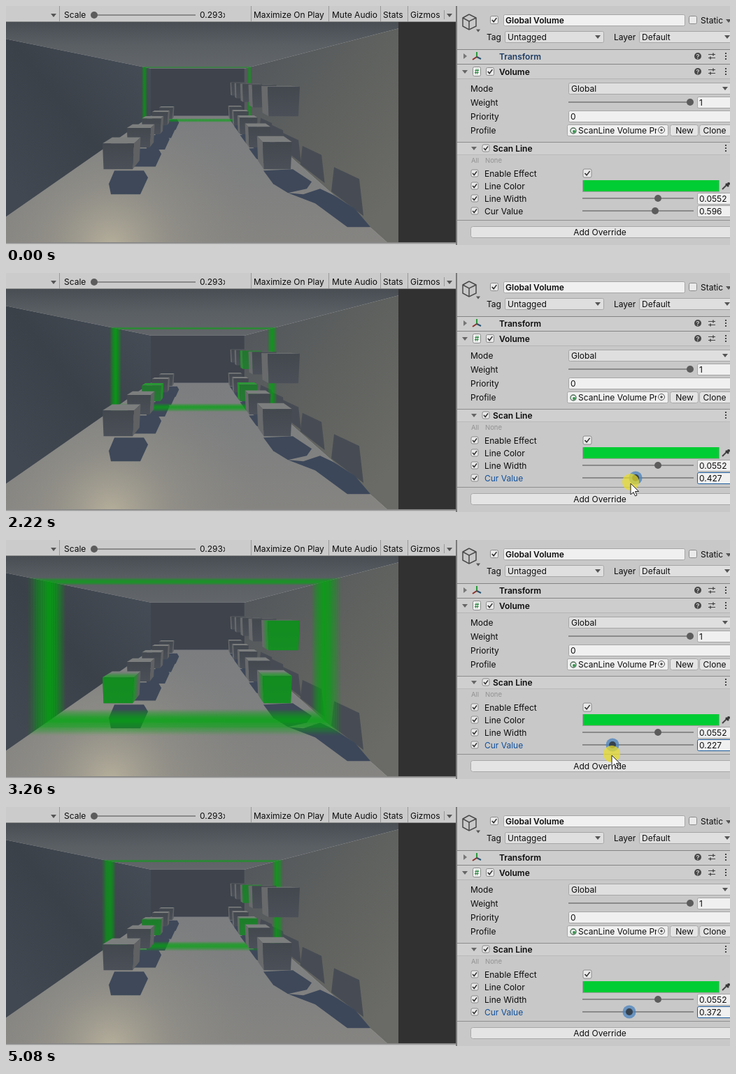
Recreate the animation shown at these times as an HTML page with a canvas. Size 1035 by 343 pixels, loop 6010 ms.

```html
<!DOCTYPE html>
<html lang="en">
<head>
<meta charset="utf-8">
<title>Scan line</title>
<style>
html, body { margin: 0; width: 100%; height: 100%; overflow: hidden; background: #c8c8c8; }
canvas { display: block; }
</style>
</head>
<body>
<canvas id="stage" width="1035" height="343"></canvas>
<script>
const ctx = document.getElementById('stage').getContext('2d');
const LOOP = 6010;
const VX = 282, VY = 105.3;          // vanishing point
const NEAR = 4.7, GAP = 1.5, DEEP = 0.5; // first cube, spacing, cube depth
const BAND = 0.55, GREEN = '#00a60e';

const BURSTS = [[370, 920, 8], [1230, 1790, 8], [1870, 2460, 8], [2550, 3100, 8],
  [3180, 3260, 2], [3960, 4370, 6], [4760, 5080, 5]];
const SCAN = [[1230, .596], [1400, .585], [1790, .53], [2207, .4], [2460, .34],
  [2943, .2525], [3100, .238], [3260, .227], [3959, .227], [3960, .221], [4206, .348], [4370, .372]];
const VALUE = [[1230, .596], [1400, .592], [1790, .552], [2207, .427], [2460, .366],
  [2943, .264], [3100, .246], [3260, .227], [3959, .227], [3960, .222], [4206, .348], [4370, .372]];
const MOUSE = [[370, 826, 338], [600, 900, 322], [760, 946, 308], [920, 927, 296], [1310, 927, 296],
  [1790, 913, 298], [2207, 893, 302], [2460, 883, 304], [2943, 870, 306], [3260, 866, 309],
  [3959, 866, 309], [4206, 889, 310], [4370, 893, 309], [4680, 893, 309], [5000, 946, 336], [5080, 950, 370]];

function stepTime(t) {
  let held = 0;
  for (const [start, end, steps] of BURSTS) {
    if (t < start) break;
    const step = (end - start) / (steps - 1);
    held = Math.min(end, start + Math.floor((t - start) / step + 1e-6) * step);
  }
  return held;
}

function sample(keys, t) {
  if (t <= keys[0][0]) return keys[0].slice(1);
  for (let i = 1; i < keys.length; i++) {
    const [a, b] = [keys[i - 1], keys[i]];
    if (t <= b[0]) {
      const u = (t - a[0]) / (b[0] - a[0]);
      return a.slice(1).map((v, j) => v + (b[j + 1] - v) * u);
    }
  }
  return keys[keys.length - 1].slice(1);
}

// --- drawing helpers ---
function rect(x, y, w, h, fill) {
  ctx.fillStyle = fill;
  ctx.fillRect(x, y, w, h);
}
function poly(points, fill) {
  ctx.beginPath();
  points.forEach(([x, y]) => ctx.lineTo(x, y));
  ctx.closePath();
  ctx.fillStyle = fill;
  ctx.fill();
}
function line(points, color, width = 1) {
  ctx.beginPath();
  points.forEach(([x, y]) => ctx.lineTo(x, y));
  ctx.strokeStyle = color;
  ctx.lineWidth = width;
  ctx.stroke();
}
function disc(x, y, r, fill) {
  ctx.beginPath();
  ctx.arc(x, y, r, 0, 7);
  ctx.fillStyle = fill;
  ctx.fill();
}
function text(s, x, y, { color = '#0c0c0c', bold = false, size = 12, align = 'left' } = {}) {
  ctx.font = `${bold ? 600 : 400} ${size}px Inter, sans-serif`;
  ctx.textAlign = align;
  ctx.fillStyle = color;
  ctx.fillText(s, x, y);
}
function clipped(x, y, w, h, draw) {
  ctx.save();
  ctx.beginPath();
  ctx.rect(x, y, w, h);
  ctx.clip();
  draw();
  ctx.restore();
}
function gradient(x0, y0, x1, y1, ...colors) {
  const g = ctx.createLinearGradient(x0, y0, x1, y1);
  colors.forEach((c, i) => g.addColorStop(i / (colors.length - 1), c));
  return g;
}
function box(x, y, w, h, fill, border = '#a6a6a6', radius = 2) {
  ctx.beginPath();
  ctx.roundRect(x + .5, y + .5, w - 1, h - 1, radius);
  ctx.fillStyle = fill;
  ctx.fill();
  ctx.strokeStyle = border;
  ctx.lineWidth = 1;
  ctx.stroke();
}

// --- 3D view ---
const project = (x, y, z) => [VX + x * NEAR / z, VY + y * NEAR / z];

function frameAt(z) {
  const s = 1000 / z;
  const l = VX - s, r = VX + s * .786, t = VY - s * .206, b = VY + s * .699;
  return [[l, t], [r, t], [r, b], [l, b]];
}

function glow(z, scan) {
  const u = Math.abs(z - scan) / BAND;
  return u < 1 ? .88 * (1 - u ** 1.4) : 0;
}

function drawBand(scan) {
  const slices = 18, step = 2 * BAND / slices;
  ctx.fillStyle = GREEN;
  for (let i = 0; i < slices; i++) {
    const z = scan - BAND + i * step;
    ctx.globalAlpha = glow(z + step / 2, scan);
    ctx.beginPath();
    for (const ring of [frameAt(z), frameAt(z + step)]) {
      ring.forEach(([x, y], j) => j ? ctx.lineTo(x, y) : ctx.moveTo(x, y));
      ctx.closePath();
    }
    ctx.fill('evenodd');
  }
  ctx.globalAlpha = 1;
}

function tint(points, alpha) {
  if (!alpha) return;
  ctx.globalAlpha = alpha;
  poly(points, GREEN);
  ctx.globalAlpha = 1;
}

// A face running in depth along the edge a-b
function sideFace(a, b, z, fill, scan) {
  const strip = (z0, z1) => [project(...a, z0), project(...b, z0), project(...b, z1), project(...a, z1)];
  poly(strip(z, z + DEEP), fill);
  const n = 5, d = DEEP / n;
  for (let i = 0; i < n; i++) tint(strip(z + i * d, z + (i + 1) * d), glow(z + (i + .5) * d, scan));
}

function drawCube([x0, x1, y0, y1], z, scan) {
  const tl = [x0, y0], tr = [x1, y0], br = [x1 - 2, y1], bl = [x0 + 1.5, y1];
  sideFace(tl, tr, z, '#7c7e7e', scan);
  if (x0 > 0) sideFace(tl, bl, z, '#686a6b', scan);
  else sideFace(tr, br, z, '#5f6163', scan);
  const front = [tl, tr, br, bl].map(p => project(...p, z));
  poly(front, gradient(0, front[0][1], 0, front[2][1], '#43484f', '#4b5058'));
  tint(front, glow(z, scan));
}

const ROWS = [[-144, -99, 92, 129], [92, 138, 10.5, 53], [85, 127, 90, 129]];
const FLOOR_SHADOWS = [
  [[-127, 131], [-85, 131], [-79, 141], [-90, 165], [-132, 165], [-135, 150]],
  [[86, 131], [128, 129], [155, 147], [148, 157], [121, 163], [100, 150]]];
const WALL_SHADOW = [[187, 126], [223, 143], [229, 196], [183, 161]];
const LONG_SHADOW = [[121, 163], [143, 165], [167, 157], [186, 166], [217, 186], [239, 212], [206, 212], [160, 178]];

function drawScene(scan) {
  const [btl, btr, bbr, bbl] = frameAt(1000 / 75);
  const [ntl, ntr, nbr, nbl] = frameAt(1);
  poly([ntl, ntr, btr, btl], gradient(0, 23, 0, 90, '#494e54', '#5a5f64', '#62666a'));
  poly([nbl, nbr, bbr, bbl], gradient(0, 156, 0, 339, '#7b7d7f', '#7f8080', '#858481'));
  const light = ctx.createRadialGradient(150, 345, 5, 150, 345, 210);
  light.addColorStop(0, 'rgba(184,177,156,.9)');
  light.addColorStop(.4, 'rgba(160,156,143,.45)');
  light.addColorStop(1, 'rgba(140,138,132,0)');
  poly([nbl, nbr, bbr, bbl], light);
  poly([ntl, btl, bbl, nbl], gradient(0, 250, 205, 90, '#424851', '#3b4149', '#454c55'));
  poly([ntr, btr, bbr, nbr], gradient(341, 100, 560, 270, '#54585c', '#60625f', '#6a6b66'));
  poly([btl, btr, bbr, bbl], '#3e434c');

  for (let i = 4; i >= 0; i--) {
    const z = NEAR + i * GAP;
    const place = shape => shape.map(p => project(...p, z));
    FLOOR_SHADOWS.forEach(s => poly(place(s), '#3e4859'));
    poly(place(WALL_SHADOW), '#474c54');
  }
  poly(LONG_SHADOW.map(p => project(...p, NEAR)), '#3c475a');
  drawBand(scan);
  for (const row of ROWS)
    for (let i = 4; i >= 0; i--) drawCube(row, NEAR + i * GAP, scan);
}

// --- editor widgets ---
function arrow(x, y, open = true, color = '#555', r = 4) {
  poly(open ? [[x - r, y - r / 2], [x + r, y - r / 2], [x, y + r / 2 + 1]]
    : [[x - r / 2, y - r], [x + r / 2 + 1, y], [x - r / 2, y + r]], color);
}
function check(x, y, size = 12, on = true) {
  box(x - size / 2, y - size / 2, size, size, '#eaeaea', '#8b8b8b');
  if (on) line([[x - size * .27, y], [x - size * .07, y + size * .22], [x + size * .28, y - size * .24]], '#303030', 1.6);
}
function popup(label, x, y, w, arrowX) {
  box(x, y, w, 17, '#dfdfdf');
  text(label, x + 4, y + 13);
  arrow(arrowX, y + 8);
}
function field(value, x, y, w, border) {
  box(x, y, w, 17, '#f0f0f0', border);
  text(value, x + 3, y + 13);
}
function slider(x0, x1, y, knob, focused) {
  rect(x0, y - 1, x1 - x0, 2, '#8a8a8a');
  if (focused) disc(knob, y, 9.5, 'rgba(72,130,190,.75)');
  disc(knob, y, 5, focused ? '#36424d' : '#5c5c5c');
}
function button(label, x, y, w, center) {
  box(x, y, w, 17, '#e4e4e4', '#a8a8a8', 3);
  text(label, center, y + 13, { align: 'center' });
}
function dots(y) {
  for (const d of [-4, 0, 4]) rect(1028, y + d - 1, 2, 2, '#444');
}
function headerIcons(y) {
  disc(989, y, 5, '#484848');
  text('?', 989, y + 3.5, { color: '#d8d8d8', bold: true, size: 9, align: 'center' });
  for (const [d, k] of [[-2.5, 1011], [2.5, 1007]]) {
    line([[1004, y + d], [1014, y + d]], '#444');
    line([[k, y + d - 2], [k, y + d + 2]], '#444', 1.5);
  }
  dots(y);
}

function drawToolbar() {
  rect(0, 0, 643, 23, '#cbcbcb');
  rect(0, 22, 643, 1, '#8f8f8f');
  for (const x of [76, 350, 461, 535, 574, 626]) rect(x, x === 626 ? 6 : 0, 1, x === 626 ? 13 : 22, '#999');
  arrow(68, 13);
  text('Scale', 83, 17);
  slider(126, 271, 13, 126);
  clipped(270, 0, 43, 22, () => text('0.293x', 277, 17));
  text('Maximize On Play', 354, 17);
  text('Mute Audio', 466, 17);
  text('Stats', 539, 17);
  text('Gizmos', 578, 17);
  arrow(634, 13);
}

function drawObjectHeader() {
  const hex = [[662, 12], [672, 17], [672, 29], [662, 34], [653, 29], [653, 17], [662, 12]];
  line(hex, '#4a4a4a', 1.5);
  line([[653, 17], [662, 22], [672, 17]], '#4a4a4a', 1.5);
  line([[662, 22], [662, 34]], '#4a4a4a', 1.5);
  arrow(675, 35, true, '#555', 3);
  check(698, 20);
  box(711, 12, 260, 17, '#f0f0f0');
  text('Global Volume', 714, 25, { bold: true });
  check(982, 20, 12, false);
  text('Static', 993, 25);
  arrow(1033, 21);
  text('Tag', 687, 49);
  popup('Untagged', 713, 36, 142, 846);
  text('Layer', 869, 49);
  popup('Default', 905, 36, 140, 1031);
}

function drawComponents(active) {
  rect(645, 62, 390, 43, '#cdcdcd');
  for (const y of [62, 83, 104]) rect(645, y, 390, 1, y === 104 ? '#b4b4b4' : '#848484');
  arrow(656, 72, false, '#777');
  line([[673, 73], [673, 66]], '#2a9a3c', 2);
  line([[673, 73], [667, 77]], '#8d3028', 2);
  line([[673, 73], [679, 76]], '#24506e', 2);
  text('Transform', 705, 77, { bold: true, color: active ? '#0c0c0c' : '#1d3c63' });
  headerIcons(72);

  arrow(656, 94, true, '#666');
  box(667, 87, 12, 14, '#f2f2f2', '#8c8c8c');
  text('#', 673, 98, { bold: true, size: 10, color: '#23863a', align: 'center' });
  check(692, 94);
  text('Volume', 705, 99, { bold: true });
  headerIcons(94);

  ['Mode', 'Weight', 'Priority', 'Profile'].forEach((s, i) => text(s, 664, 123 + i * 20));
  popup('Global', 804, 110, 240, 1028);
  slider(804, 978, 138, 978);
  field('1', 988, 130, 60);
  field('0', 804, 150, 240);
  box(802, 170, 145, 17, '#f0f0f0');
  ctx.beginPath();
  ctx.arc(811, 179, 4, 0, 7);
  ctx.strokeStyle = '#4c6b55';
  ctx.lineWidth = 1.3;
  ctx.stroke();
  disc(812, 180, 2, '#2f9447');
  clipped(816, 170, 114, 17, () => text('ScanLine Volume Profile', 818, 183));
  ctx.beginPath();
  ctx.arc(937, 178, 4.5, 0, 7);
  ctx.strokeStyle = '#555';
  ctx.lineWidth = 1;
  ctx.stroke();
  disc(937, 178, 1.7, '#444');
  button('New', 949, 170, 41, 970);
  button('Clone', 991, 170, 54, 1013);
}

function drawOverride(value, active) {
  rect(645, 195, 390, 18, '#cfcfcf');
  rect(645, 195, 390, 1, '#8c8c8c');
  rect(645, 213, 390, 1, '#bababa');
  arrow(669, 204, true, '#666');
  check(686, 204, 11);
  text('Scan Line', 696, 209, { bold: true });
  dots(204);
  text('All', 665, 225, { size: 9.5, color: '#929292' });
  text('None', 685, 225, { size: 9.5, color: '#929292' });
  ['Enable Effect', 'Line Color', 'Line Width', 'Cur Value'].forEach((s, i) => {
    check(670, 240 + i * 18, 11);
    text(s, 684, 245 + i * 18, { color: active && i === 3 ? '#0f4f9c' : '#0c0c0c' });
  });
  check(831, 240, 13);
  rect(824, 250, 196, 17, '#a0a0a0');
  rect(825, 250, 194, 16, '#00cc33');
  line([[1024, 263], [1030, 257]], '#444', 2);
  line([[1029, 255], [1033, 259]], '#333', 2.5);
  disc(1033, 255, 2, '#333');
  slider(824, 983, 276, 932);
  field('0.0552', 988, 268, 60);
  slider(824, 983, 294, 829.5 + 165.3 * value, active);
  field(value.toFixed(3), 988, 286, 60, active ? '#1d5c9e' : undefined);
  rect(645, 307, 390, 1, '#8f8f8f');
  button('Add Override', 664, 316, 380, 849);
}

function drawMouse(x, y) {
  disc(x, y - 2, 12, 'rgba(232,220,40,.72)');
  const shape = [[0, 0], [0, 16], [4, 12.5], [6.5, 18], [9, 17], [6.5, 11.5], [11.5, 11.5]]
    .map(([dx, dy]) => [x + dx, y + dy]);
  poly(shape, '#fff');
  line([...shape, shape[0]], '#222');
}

function draw(now) {
  const t = stepTime(now % LOOP);
  const [scan] = sample(SCAN, t), [value] = sample(VALUE, t);
  const active = t >= 1300;
  rect(0, 0, 1035, 343, '#c8c8c8');
  rect(561, 23, 82, 316, '#313131');
  clipped(0, 23, 561, 316, () => drawScene(20 * scan));
  rect(0, 339, 643, 2, '#8d8d8d');
  drawToolbar();
  rect(643, 0, 2, 343, '#7a7a7a');
  drawObjectHeader();
  drawComponents(active);
  drawOverride(value, active);
  if (t >= 370 && t < 5080) drawMouse(...sample(MOUSE, t));
}

const start = performance.now();
function tick() {
  draw(performance.now() - start);
  requestAnimationFrame(tick);
}
tick();
</script>
</body>
</html>
```
